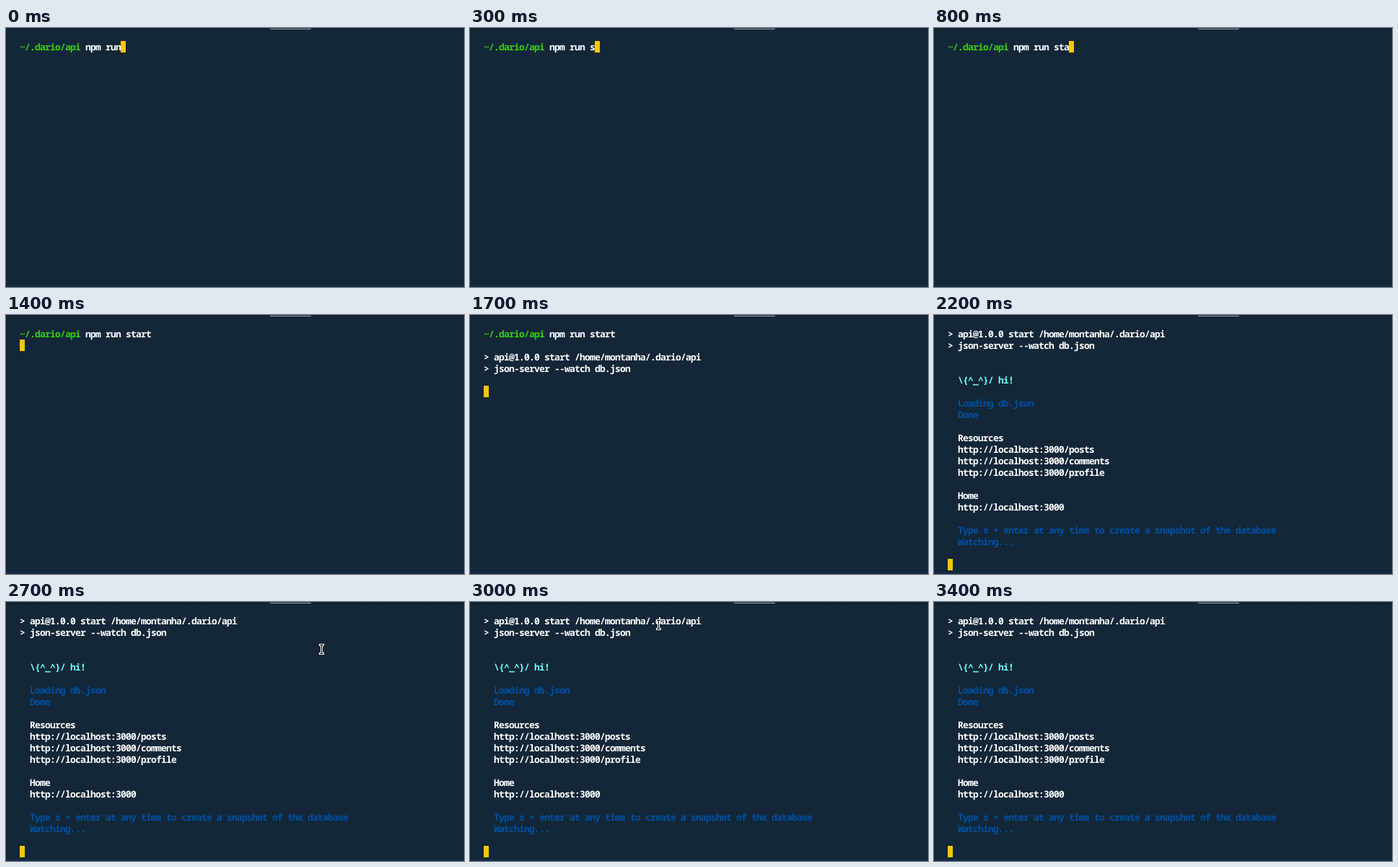
An HTML page for the animation above (4000 ms loop, 635 px wide and 359 px high).

```html
<!DOCTYPE html>
<html lang="en">
<head>
<meta charset="utf-8">
<title>Terminal</title>
<style>
  html, body { margin: 0; width: 100%; height: 100%; overflow: hidden; background: #132738; }
  .stage { position: relative; width: 635px; height: 359px; overflow: hidden; background: #132738; }
  .stage > * { position: absolute; }
  .top { inset: 0 0 auto; height: 4px; background: linear-gradient(#0e1f2e, #132738); }
  .tab { left: 366px; top: 1px; width: 57px; height: 1px; background: #a9b0b4; }
  .bottom { inset: auto 0 0; height: 1px; background: #0f1f2d; border-top: 1px solid #163a59; }

  /* Cells are 7 x 16 px. */
  .view { left: 19px; top: 18px; right: 0; bottom: 0; overflow: hidden; }
  pre {
    margin: 0; color: #fff;
    font: 600 13px/16px "Noto Sans Mono", monospace;
    letter-spacing: calc(7px - .6em);
    text-indent: 0;
    font-variant-ligatures: none;
    text-rendering: geometricPrecision;
  }
  .green { color: #35d011; }
  .cyan { color: #70fbff; }
  .blue { color: #0050a4; }
  b { font-weight: 700; }
  .typed { display: inline-block; }
  .cursor { left: 19px; top: 18px; width: 7px; height: 16px; background: #ffc600; }
  .pointer { left: 0; top: 0; width: 13px; height: 18px; overflow: visible; }

  pre, .typed, .cursor, .pointer, .out, .ibeam, .arrow { animation: 4s step-end infinite; }
  pre { animation-name: scroll; }
  .typed { animation-name: type; }
  .cursor { animation-name: cursor; }
  .pointer { animation-name: move; }
  .ibeam { animation-name: ibeam; }
  .arrow { animation-name: arrow; }
  .command { animation-name: command; }
  .loading { animation-name: loading; }
  .ready { animation-name: ready; }

  @keyframes scroll { from { transform: none; } 55%, to { transform: translateY(-32px); } }
  @keyframes type {
    from { clip-path: inset(0 35px 0 0); }
    7.5% { clip-path: inset(0 28px 0 0); }
    12.5% { clip-path: inset(0 21px 0 0); }
    20% { clip-path: inset(0 14px 0 0); }
    25% { clip-path: inset(0 7px 0 0); }
    32.5%, to { clip-path: inset(0 -1px 0 0); }
  }
  @keyframes cursor {
    from { transform: translate(140px, 0); }
    5% { transform: translate(147px, 0); }
    7.5% { transform: translate(154px, 0); }
    12.5% { transform: translate(161px, 0); }
    20% { transform: translate(168px, 0); }
    25% { transform: translate(175px, 0); }
    32.5% { transform: translate(182px, 0); }
    35% { transform: translate(0, 16px); }
    42.5% { transform: translate(0, 80px); }
    52.5% { transform: translate(0, 160px); }
    55%, to { transform: translate(0, 320px); }
  }
  @keyframes command { from { visibility: hidden; } 42.5%, to { visibility: visible; } }
  @keyframes loading { from { visibility: hidden; } 52.5%, to { visibility: visible; } }
  @keyframes ready { from { visibility: hidden; } 55%, to { visibility: visible; } }

  @keyframes move {
    from, 67.5% { transform: translate(434px, 58px); }
    70% { transform: translate(390px, 50px); }
    72.5% { transform: translate(326px, 38px); }
    75% { transform: translate(258px, 24px); }
    77.5% { transform: translate(190px, 11px); }
    80% { transform: translate(131px, 0); }
    82.5%, to { transform: translate(95px, -8px); }
  }
  @keyframes ibeam { from, 80%, to { visibility: hidden; } 67.5% { visibility: visible; } }
  @keyframes arrow { from, 85%, to { visibility: hidden; } 80% { visibility: visible; } }
</style>
</head>
<body>
<div class="stage">
  <div class="top"></div>
  <div class="tab"></div>
  <div class="bottom"></div>
  <div class="view"><pre><span class="green">~/.dario/api</span> npm run <span class="typed">start</span>

<span class="out command">&gt; api@1.0.0 start /home/montanha/.dario/api
&gt; json-server --watch db.json</span>


<span class="out loading">  <span class="cyan">\{^_^}/ hi!</span>

<span class="blue">  Loading db.json
  Done</span></span>

<span class="out ready">  <b>Resources</b>
  http://localhost:3000/posts
  http://localhost:3000/comments
  http://localhost:3000/profile

  <b>Home</b>
  http://localhost:3000

<span class="blue">  Type s + enter at any time to create a snapshot of the database
  Watching...</span></span></pre></div>
  <div class="cursor"></div>
  <svg class="pointer" viewBox="0 0 13 18">
    <g class="ibeam" fill="none">
      <path d="M0 1.5H7M0 13.5H7M3.5 1.5V13.5" stroke="#fff" stroke-width="3"/>
      <path d="M1 1.5H6M1 13.5H6M3.5 1.5V13.5" stroke="#000"/>
    </g>
    <path class="arrow" d="M.5.7V14.5L3.7 11.5 6 16.5 8.3 15.5 6.1 10.6H11.3Z" fill="#000" stroke="#fff"/>
  </svg>
</div>
</body>
</html>
```
